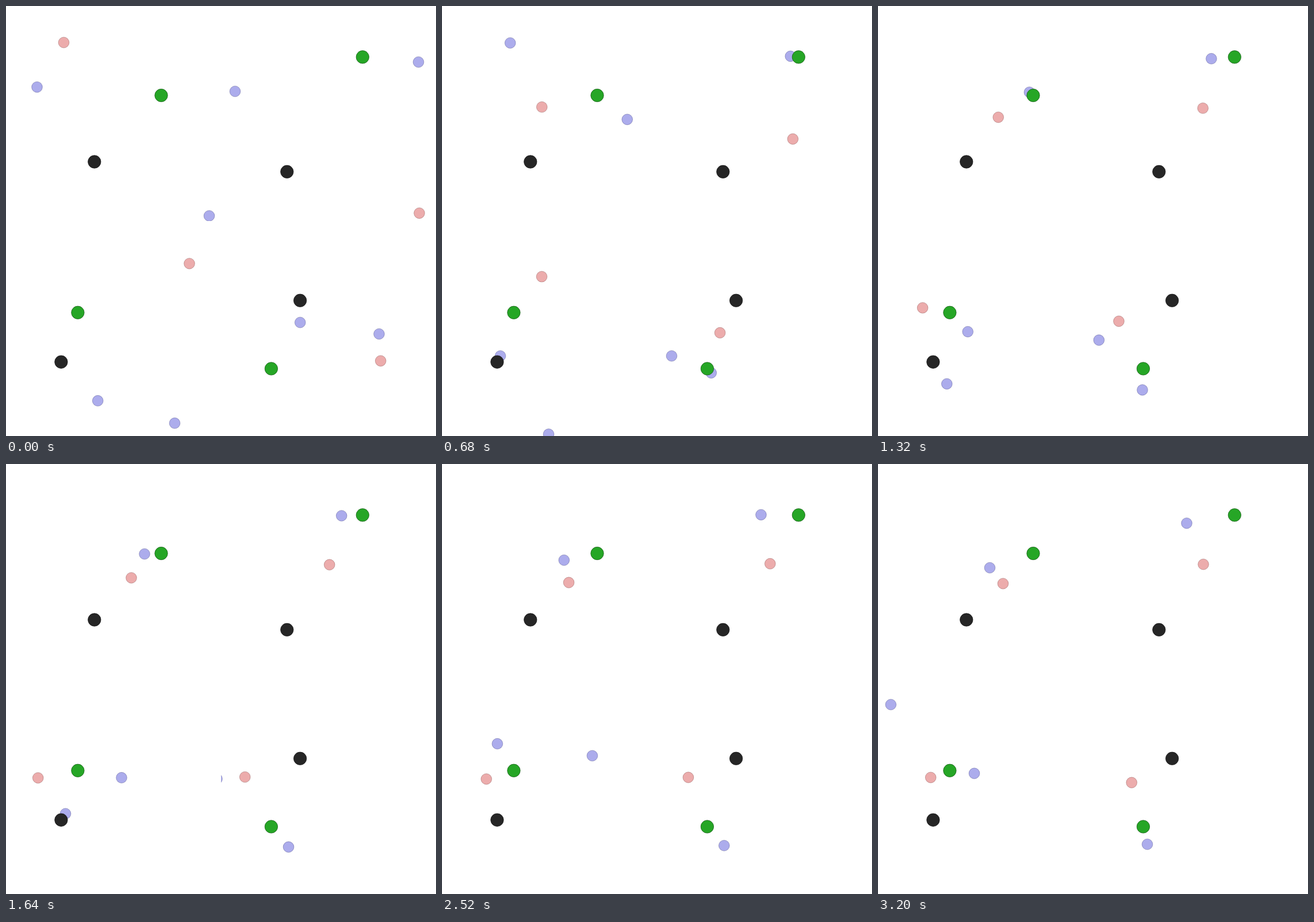
These frames come from a looping animation (748x748 px, 3240 ms). An HTML page with a canvas:

```html
<!DOCTYPE html>
<html lang="en">
<head>
<meta charset="utf-8">
<title>Agents and landmarks</title>
<style>
  html, body { margin: 0; width: 100%; height: 100%; overflow: hidden; background: #fff; }
  canvas { display: block; }
</style>
</head>
<body>
<canvas id="stage" width="748" height="748"></canvas>
<script>
const ctx = document.getElementById('stage').getContext('2d');
const SIZE = 748, HALF = SIZE / 2;
const STEP = 40, STEPS = 81;
const AGENT_R = 9.35, MARK_R = 11.2;

const RED = [217, 89, 89], BLUE = [89, 89, 217];
const GREEN = [38, 166, 38], BLACK = [38, 38, 38];

// Steps at which the waypoints of a path are reached
const KEYS = [0, 9, 25, 41, 55, 80];

// Four independent worlds, row by row, each clipped to its own quadrant.
// A shorter path belongs to an agent that leaves its world for good.
const worlds = [
  {
    goal: [270, 155.5], decoy: [153.8, 271],
    red: [[100.5, 63.5], [145, 146], [194.5, 185], [218, 198], [220.5, 204], [217.5, 208]],
    blues: [
      [[353.5, 365], [347.5, 262.5], [290.5, 157.5], [241, 156.5], [222, 162.5], [194.5, 180.5]],
      [[54, 141], [64.5, 119.5], [215, -25]]
    ]
  },
  {
    goal: [620.3, 88.8], decoy: [488.8, 288.3],
    red: [[719, 360.3], [655.5, 286.3], [578.5, 192], [562.7, 175.2], [569.7, 173.7], [566, 174.5]],
    blues: [
      [[717.5, 97.5], [648.5, 86], [581.5, 92], [583.7, 90], [564.7, 86.2], [537, 103]],
      [[398.5, 148.5], [460.8, 54], [585, -130]]
    ]
  },
  {
    goal: [124.9, 533.3], decoy: [95.9, 619.2],
    red: [[319, 448], [240, 450.5], [117.5, 498], [55.7, 546], [69.7, 548], [91.7, 545.3]],
    blues: [
      [[159.7, 686.7], [109, 636.3], [119, 588.5], [201, 545.7], [263.2, 511.2], [167.5, 538.2]],
      [[293.5, 725.7], [232, 763], [148, 702.2], [103.5, 608.3], [110.5, 526.5], [22.3, 418.5]]
    ]
  },
  {
    goal: [461.4, 630.9], decoy: [511.6, 512.3],
    red: [[651.7, 617.3], [551.3, 587], [437.7, 556], [415.7, 544.5], [423.3, 543.5], [441.2, 554.2]],
    blues: [
      [[649, 570.5], [532.7, 606.3], [440, 662.3], [491.5, 666.2], [494.7, 664.7], [468.5, 661.5]],
      [[511.7, 550.5], [421, 592.5], [399, 606.2], [367, 547.7], [330, 500]]
    ]
  }
];

const slope = (path, i, a) => (path[i + 1][a] - path[i][a]) / (KEYS[i + 1] - KEYS[i]);

// Agents start at rest, blend neighbouring slopes, and end on a parabola
function speed(path, i, a) {
  if (i === 0) return 0;
  if (i === path.length - 1) return 2 * slope(path, i - 1, a) - speed(path, i - 1, a);
  const before = KEYS[i] - KEYS[i - 1], after = KEYS[i + 1] - KEYS[i];
  return (slope(path, i - 1, a) * after + slope(path, i, a) * before) / (before + after);
}

// Hermite interpolation between waypoints
function place(path, step) {
  const last = path.length - 1;
  if (step > KEYS[last]) return null;
  let i = 0;
  while (i < last - 1 && step >= KEYS[i + 1]) i++;
  const span = KEYS[i + 1] - KEYS[i];
  const s = (step - KEYS[i]) / span, r = 1 - s;
  return [0, 1].map(a =>
    path[i][a] * r * r * (1 + 2 * s) +
    path[i + 1][a] * s * s * (3 - 2 * s) +
    span * s * r * (r * speed(path, i, a) - s * speed(path, i + 1, a)));
}

function disc(point, radius, color, alpha, edge) {
  if (!point) return;
  ctx.beginPath();
  ctx.arc(point[0], point[1], radius, 0, Math.PI * 2);
  ctx.fillStyle = `rgba(${color}, ${alpha})`;
  ctx.fill();
  ctx.strokeStyle = `rgba(${color.map(c => c / 2)}, ${edge})`;
  ctx.stroke();
}

const agent = (path, step, color) => disc(place(path, step), AGENT_R, color, 0.5, 0.35);
const landmark = (point, color) => disc(point, MARK_R, color, 1, 0.7);

function draw(step) {
  ctx.clearRect(0, 0, SIZE, SIZE);
  worlds.forEach((w, i) => {
    ctx.save();
    ctx.beginPath();
    ctx.rect(i % 2 * HALF, Math.floor(i / 2) * HALF, HALF, HALF);
    ctx.clip();
    agent(w.red, step, RED);
    w.blues.forEach(path => agent(path, step, BLUE));
    landmark(w.goal, GREEN);
    landmark(w.decoy, BLACK);
    ctx.restore();
  });
}

const start = performance.now();
function tick() {
  draw(Math.floor((performance.now() - start) / STEP) % STEPS);
  requestAnimationFrame(tick);
}
tick();
</script>
</body>
</html>
```
